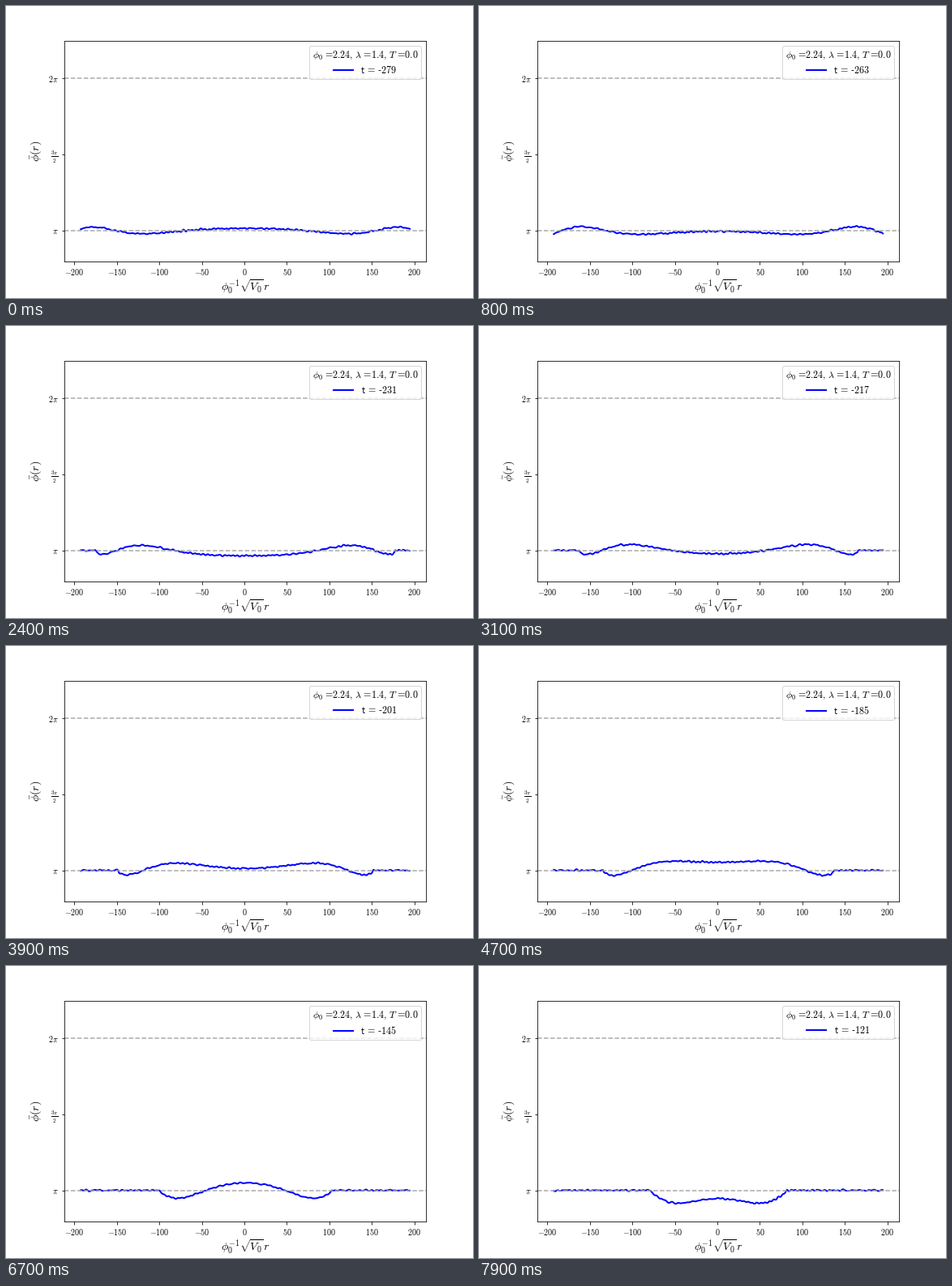
Recreate the animation shown at these times as a matplotlib script. Size 576 by 360 pixels, loop 8 s.

```python
import numpy as np
import matplotlib.pyplot as plt
from matplotlib.animation import FuncAnimation

plt.rcParams.update({
    "font.family": "Liberation Sans",
    "mathtext.fontset": "cm",
})

FRAMES, INTERVAL = 80, 100
T0, DT = -279, 2
T_END = -30        # time at which the collapsing wave would focus
CENTRE = 1.5
PX = np.pi / 188   # field value per pixel of height

x = np.linspace(-192.6, 194.8, 389)

# Small ripples: travelling waves with random direction and phase
rng = np.random.default_rng(4)
MODES = 48
k = rng.uniform(.12, 1.3, MODES)
omega = np.sqrt(k**2 + .01) * rng.choice([-1, 1], MODES)
phase = rng.uniform(0, 2 * np.pi, MODES)


def wave(t):
    """Wave inside a shrinking cone; its phase depends on proper time."""
    s = T_END - t
    r = x - CENTRE
    tau = np.sqrt(np.maximum(s**2 - 1.3 * r**2, 0))
    size = 75 * np.exp(-tau / 85) * np.maximum(1 - (r / s)**2, 0)**1.7
    return -size * np.sin(np.pi * (.00765 * tau + 2.108e-5 * tau**2))


def ripples(t):
    waves = np.cos(np.outer(x, k) - omega * t + phase)
    return .45 * np.sqrt(2 / MODES) * waves.sum(axis=1)


def field(t):
    return np.pi + PX * (.4 + wave(t) + ripples(t))


def time_label(t):
    return rf"$\mathsf{{t}}\,=\,$-$\mathsf{{{abs(t)}}}$"


def setting(symbol, value):
    return rf"{symbol}\hspace{{0.08}}=\hspace{{-0.2}}\mathsf{{{value}}}"


fig, ax = plt.subplots(figsize=(8, 5), dpi=72)
fig.subplots_adjust(left=.125, right=.9, bottom=.125, top=.88)

line, = ax.plot(x, field(T0), color="blue", lw=2, label=time_label(T0))
for level in (np.pi, 2 * np.pi):
    ax.axhline(level, color="darkgray", ls="--", lw=1.5)

ax.set_xlim(-211.9, 214.2)
ax.set_ylim(np.pi - 38 * PX, 2 * np.pi + 45.8 * PX)
xticks = range(-200, 201, 50)
ax.set_xticks(xticks, [f"${v}$" for v in xticks])
ax.set_yticks([np.pi, 1.5 * np.pi, 2 * np.pi],
              [r"$\pi$", r"$\frac{3\pi}{2}$", r"$2\pi$"])
ax.set_xlabel(r"$\phi_0^{-1}\sqrt{\hspace{-0.1}V_0\hspace{-0.1}}"
              r"\hspace{0.2}r$", fontsize=14)
ax.set_ylabel(r"$\bar{\phi}(r)$", fontsize=14)
ax.xaxis.set_label_coords(.5, -.077)
ax.yaxis.set_label_coords(-.059, .5)

title = r",\,".join([setting(r"\phi_0", 2.24), setting(r"\lambda", 1.4),
                     setting("T", 0.0)])
legend = ax.legend(title=f"${title}$", fontsize=12, title_fontsize=12,
                   loc="upper right", borderpad=.33, labelspacing=.45)
label = legend.get_texts()[0]


def update(i):
    t = T0 + DT * i
    line.set_ydata(field(t))
    label.set_text(time_label(t))
    return line, label


anim = FuncAnimation(fig, update, frames=FRAMES, interval=INTERVAL,
                     repeat=True, repeat_delay=0)
plt.show()
```
